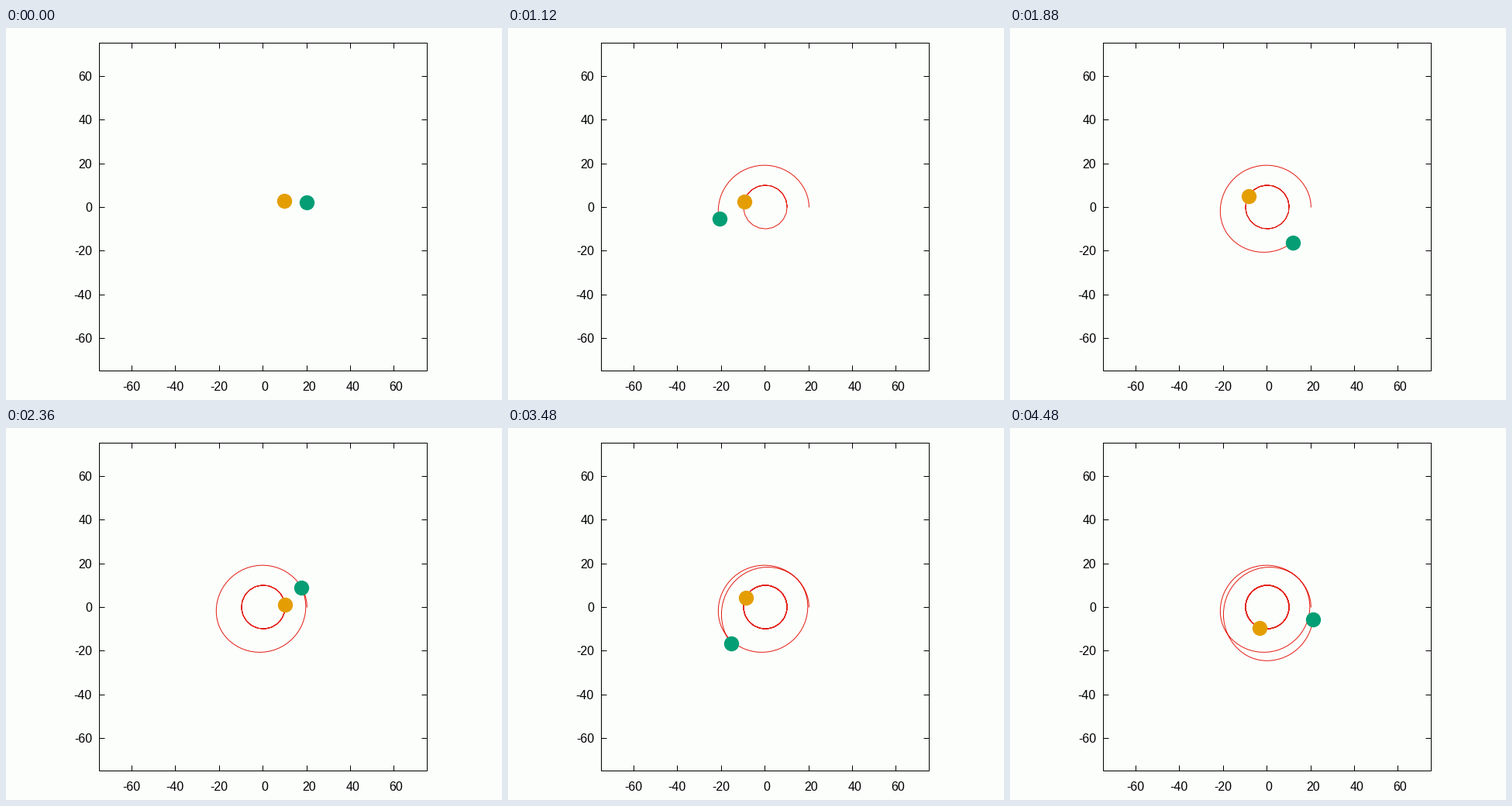
Recreate the animation shown at these times as a matplotlib script. Size 640 by 480 pixels, loop 4520 ms.

```python
import numpy as np
import matplotlib.pyplot as plt
from matplotlib.animation import FuncAnimation

W, H, DPI = 640, 480, 100
FRAMES, INTERVAL = 113, 40
PX = 72 / DPI                     # one pixel in points
LEFT, RIGHT, TOP, BOTTOM = 120.5, 543.5, 19.5, 442.5
SCALE = (RIGHT - LEFT) / 150
CX, CY = 332, 231
SUBSTEPS = 40

STAR, PLANET = 100.0, 5.0         # gravitational parameters
R_IN, R_OUT = 10.0, 20.0
OMEGA = np.sqrt(STAR / R_IN**3)


def inner(t):
    return R_IN * np.array([np.cos(OMEGA * t), np.sin(OMEGA * t)])


def pull(gm, d):
    return -gm * d / np.hypot(*d)**3


def rate(t, s):
    p, v = s[:2], s[2:]
    return np.concatenate([v, pull(STAR, p) + pull(PLANET, p - inner(t))])


def outer_orbit(n):
    """Outer body, pulled by the fixed star and the inner body (RK4)."""
    h = 1 / SUBSTEPS
    s = np.array([R_OUT, 0, 0, np.sqrt(STAR / R_OUT)])
    path = [s[:2]]
    for i in range(n * SUBSTEPS):
        t = i * h
        k1 = rate(t, s)
        k2 = rate(t + h / 2, s + h / 2 * k1)
        k3 = rate(t + h / 2, s + h / 2 * k2)
        k4 = rate(t + h, s + h * k3)
        s = s + h / 6 * (k1 + 2 * k2 + 2 * k3 + k4)
        if (i + 1) % SUBSTEPS == 0:
            path.append(s[:2])
    return np.array(path)


def to_px(path):
    return np.array([CX, CY]) + path * [SCALE, -SCALE]


paths = [to_px(inner(np.arange(FRAMES + 1)).T), to_px(outer_orbit(FRAMES))]

fig = plt.figure(figsize=(W / DPI, H / DPI), dpi=DPI, facecolor="#fcfefc")
ax = fig.add_axes([0, 0, 1, 1])
ax.set_xlim(0, W)
ax.set_ylim(H, 0)
ax.axis("off")


def rule(xs, ys):
    ax.plot(xs, ys, color="black", lw=PX, snap=False,
            solid_capstyle="butt", solid_joinstyle="miter", zorder=1)


def label(x, y, v, ha):
    ax.text(x, y, str(v), ha=ha, va="baseline", color="black",
            family="Liberation Sans", fontsize=16 * PX)


rule([LEFT, RIGHT, RIGHT, LEFT, LEFT, RIGHT], [TOP, TOP, BOTTOM, BOTTOM, TOP, TOP])
for v in range(-60, 61, 20):
    x = np.floor(CX - 0.3 + v * SCALE) + 0.5
    y = np.floor(CY + 0.4 - v * SCALE) + 0.5
    for edge, d in ((TOP, 7), (BOTTOM, -7)):
        rule([x, x], [edge, edge + d])
    for edge, d in ((LEFT, 7), (RIGHT, -7)):
        rule([edge, edge + d], [y, y])
    label(x + (2.6 if v >= 0 else -0.5), 468, v, "center")
    label(111, y + 5.5, v, "right")

trails = [ax.plot([], [], color="#e41e14", lw=PX, snap=False, zorder=2)[0]
          for _ in paths]
dots = [ax.plot([], [], "o", color=c, ms=19.4 * PX, mew=0, zorder=3)[0]
        for c in ("#e49e04", "#049e74")]


def update(i):
    for path, trail, dot in zip(paths, trails, dots):
        trail.set_data(*path[:i + 2].T)
        x, y = np.floor(path[i + 1]) + 0.5
        dot.set_data([x], [y])
    return trails + dots


anim = FuncAnimation(fig, update, frames=FRAMES, interval=INTERVAL,
                     repeat=True, repeat_delay=0)
plt.show()
```
